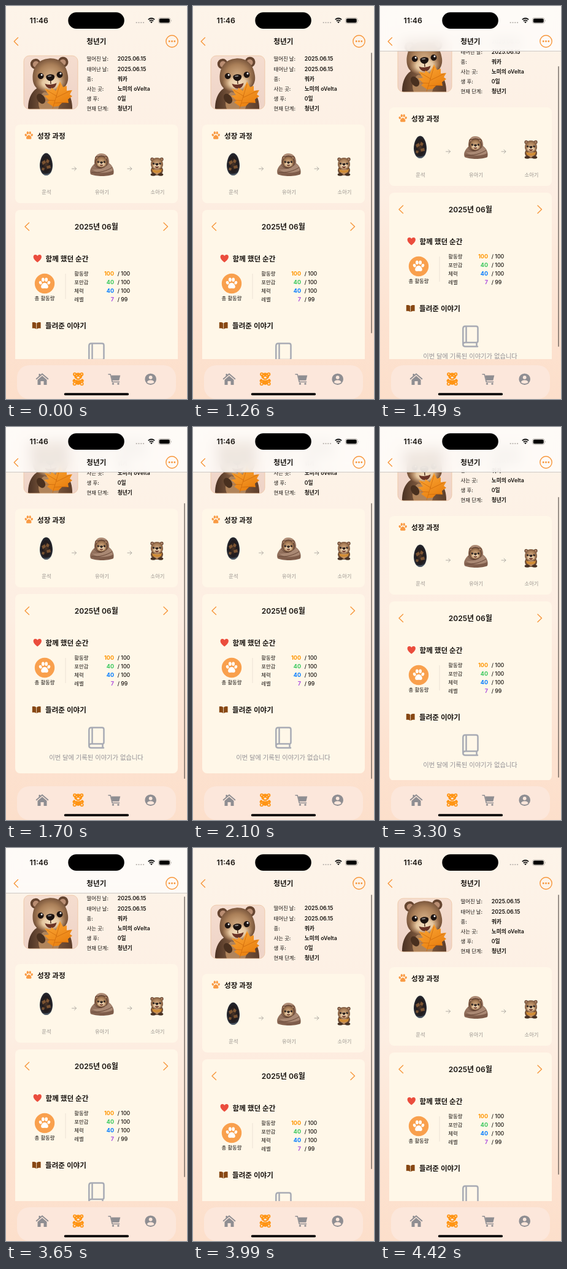
An HTML page that plays this animation: 295 by 640 pixels, repeating every 5420 ms.

```html
<!DOCTYPE html>
<html lang="ko">
<head>
<meta charset="utf-8">
<title>청년기</title>
<style>
  html, body { margin: 0; width: 100%; height: 100%; overflow: hidden; }
  #stage {
    position: relative; width: 295px; height: 640px; overflow: hidden;
    background: linear-gradient(#fdf4e9, #fdeee2 48%, #fde2d0 82%, #fcdfcb);
    font-family: Inter, "Noto Sans CJK KR", sans-serif;
  }
  #view { position: absolute; inset: 0 0 65px; overflow: hidden; }
  svg { position: absolute; left: 0; top: 0; display: block; }
  #bar {
    position: absolute; left: 0; top: 0; width: 295px; height: 73px;
    background: rgba(254, 252, 250, .84); backdrop-filter: blur(10px);
    border-bottom: .5px solid rgba(0, 0, 0, .2);
  }
  #thumb {
    position: absolute; left: 289.7px; width: 2.6px; border-radius: 2px;
    background: rgba(60, 55, 50, .52);
  }
  text { fill: #17130f; }
  .h { font-size: 11.6px; font-weight: 600; }
  .k { font-size: 8.4px; font-weight: 500; }
  .v { font-size: 8.8px; font-weight: 600; }
  .m { font-size: 8.8px; font-weight: 500; }
  .n { font-size: 9px; font-weight: 700; text-anchor: end; }
  .c { font-size: 8.3px; text-anchor: middle; fill: #96918c; }
  .mid { text-anchor: middle; }
  .line { fill: none; stroke: #f7973c; stroke-linecap: round; stroke-linejoin: round; stroke-width: 1.4; }
</style>
</head>
<body>
<div id="stage">
  <div id="view">
    <svg width="295" height="700">
      <defs>
        <symbol id="paw" viewBox="0 0 24 24">
          <g fill="currentColor">
            <ellipse cx="3.8" cy="11" rx="2.7" ry="3.5" transform="rotate(-22 3.8 11)"/>
            <ellipse cx="8.8" cy="5.2" rx="2.8" ry="3.9"/>
            <ellipse cx="15.2" cy="5.2" rx="2.8" ry="3.9"/>
            <ellipse cx="20.2" cy="11" rx="2.7" ry="3.5" transform="rotate(22 20.2 11)"/>
            <path d="M12 11c3.6 0 7 4.4 7 8 0 4-4 3-7 3s-7 1-7-3c0-3.6 3.4-8 7-8z"/>
          </g>
        </symbol>
        <radialGradient id="fur" cx=".5" cy=".5" r=".58">
          <stop stop-color="#d3ad84"/><stop offset=".55" stop-color="#ab8059"/><stop offset="1" stop-color="#664530"/>
        </radialGradient>
        <radialGradient id="muzzle">
          <stop stop-color="#f4dfc0"/><stop offset=".55" stop-color="#e5c7a0"/><stop offset="1" stop-color="#b98f69" stop-opacity=".1"/>
        </radialGradient>
        <linearGradient id="wall" x2="0" y2="1">
          <stop stop-color="#f5ddcf"/><stop offset="1" stop-color="#eed3c7"/>
        </linearGradient>
        <linearGradient id="body" x2="1">
          <stop stop-color="#4a3123"/><stop offset=".45" stop-color="#8a6345"/><stop offset="1" stop-color="#5c3d2a"/>
        </linearGradient>
        <linearGradient id="leafFill" x2=".6" y2="1">
          <stop stop-color="#fba93a"/><stop offset="1" stop-color="#ea800f"/>
        </linearGradient>
        <radialGradient id="stone" cx=".5" cy=".5" r=".56">
          <stop stop-color="#4a3426"/><stop offset=".55" stop-color="#1f1a1c"/><stop offset=".85" stop-color="#25272f"/><stop offset="1" stop-color="#6a7480"/>
        </radialGradient>
        <linearGradient id="wrap" x2=".3" y2="1">
          <stop stop-color="#b8967f"/><stop offset="1" stop-color="#7e5c4a"/>
        </linearGradient>
        <symbol id="head" viewBox="0 0 60 56">
          <circle cx="9" cy="10" r="8" fill="#664530"/><circle cx="9.5" cy="10.5" r="4.8" fill="#b98d72"/>
          <circle cx="51" cy="10" r="8" fill="#664530"/><circle cx="50.5" cy="10.5" r="4.8" fill="#b98d72"/>
          <path d="M30 3C47 3 56 15 57 31 58 46 47 55 30 55S2 46 3 31C4 15 13 3 30 3z" fill="url(#fur)"/>
          <ellipse cx="30" cy="40" rx="23" ry="15" fill="url(#muzzle)"/>
          <g fill="#1c1310">
            <circle cx="15.500" cy="29" r="4.600"/><circle cx="44.500" cy="29" r="4.600"/>
            <path d="M23.500 31c0-5 13-5 13 0 0 4-4 6.500-6.500 6.500s-6.500-2.500-6.500-6.500z"/>
            <path d="M21 41q9 4 18 0-2 8-9 8t-9-8z" fill="#6b3426"/>
          </g>
          <path d="M30 37v5" stroke="#51301f" stroke-width="1.400"/>
          <g fill="#fff"><circle cx="17" cy="27.300" r="1.400"/><circle cx="46" cy="27.300" r="1.400"/><ellipse cx="29" cy="30" rx="3" ry="1" opacity=".5"/></g>
        </symbol>
        <clipPath id="frame"><rect x="29" y="81" width="88" height="87" rx="9"/></clipPath>
        <path id="eggShape" d="M65.500 239.500c6 0 10.500 11 10.500 20.500 0 9-4.500 16-10.500 16s-10.500-7-10.500-16c0-9.500 4.500-20.500 10.500-20.500z"/>
        <clipPath id="egg"><use href="#eggShape"/></clipPath>
      </defs>
      <g id="page">
        <g clip-path="url(#frame)">
          <rect x="29" y="81" width="88" height="87" fill="url(#wall)"/>
          <path d="M36 170C35 146 46 128 72 128s37 18 36 42z" fill="url(#body)"/>
          <ellipse cx="70" cy="158" rx="17" ry="20" fill="#b0845b"/>
          <use href="#head" x="40" y="82" width="64" height="60" transform="rotate(-4 72 112)"/>
          <path d="M88 123l5 9 6-2 0 8 9-1-4 7 4 3-7 5 1 6-10-1-6 6-9 1-10-7 4-3-9-8 8-1-7-10 10 2 1-4 7 5z" fill="url(#leafFill)"/>
          <path d="M76 167l12-40M83 147l-17-10M82 149l23-11M79 158l20-1M80 154l-16-1" fill="none" stroke="#cf6a0c" stroke-width=".8"/>
          <ellipse cx="57" cy="151" rx="6" ry="9" fill="#49301f" transform="rotate(-35 57 151)"/>
        </g>
        <rect x="29" y="81" width="88" height="87" rx="9" fill="none" stroke="#ecc3a0" stroke-width=".8"/>
        <g id="facts"></g>

        <g fill="#fff7e8">
          <rect x="15" y="193" width="265" height="128" rx="8"/>
          <rect x="15" y="332" width="265" height="292" rx="8"/>
        </g>
        <use href="#paw" x="30" y="203.500" width="14.500" height="14.500" color="#f99a43"/>
        <text class="h" x="51" y="215.500">성장 과정</text>

        <use href="#eggShape" fill="url(#stone)"/>
        <g clip-path="url(#egg)">
          <path d="M58 254l5-3 2 4-5 4zM67 249l4 3-2 4-4-2zM66 261l6-2 1 5-6 1zM59 263l4 1-1 4-4-1z" fill="#b07540" opacity=".6"/>
          <path d="M55 271q10 6 21-2v9H55z" fill="#687a8b" opacity=".6"/>
        </g>
        <g>
          <path d="M138 274c-3-7 2-13 6-17-1-11 4-17 11-17 9 0 14 7 13 16 6 4 9 12 7 18-8 4-29 4-37 0z" fill="url(#wrap)"/>
          <ellipse cx="155.500" cy="254" rx="10.500" ry="10.500" fill="#5b3d2e"/>
          <use href="#head" x="145" y="243.500" width="21" height="20"/>
          <path d="M140 266c10 1 21-2 28-9 4 2 6 7 6 11-9 5-26 5-34-2z" fill="#a98873"/>
          <path d="M144 258c3 7 10 8 17 4M139 271c13 1 24-2 34-8" fill="none" stroke="#664737"/>
        </g>
        <g>
          <ellipse cx="246" cy="267.500" rx="10" ry="8.500" fill="#6d4a32"/>
          <ellipse cx="246" cy="269" rx="5.500" ry="5.500" fill="#c09064"/>
          <path d="M238 265q8 6 16 0l-1 5q-7 3-14 0z" fill="#d18d35"/>
          <ellipse cx="240" cy="274.500" rx="4.300" ry="2.200" fill="#453023"/><ellipse cx="252" cy="274.500" rx="4.300" ry="2.200" fill="#453023"/>
          <use href="#head" x="235" y="246" width="22" height="20.500"/>
        </g>
        <g fill="none" stroke="#aaa49e" stroke-width=".9" stroke-linecap="round" stroke-linejoin="round">
          <path id="arrow" d="M107.500 265h7m-3-3 3 3-3 3"/>
          <use href="#arrow" x="90.500"/>
        </g>
        <text class="c" x="66" y="306">운석</text>
        <text class="c" x="156.500" y="306">유아기</text>
        <text class="c" x="247" y="306">소아기</text>

        <path class="line" d="M37.500 353l-6.500 6.300 6.500 6.300M257 353l6.500 6.300-6.500 6.300"/>
        <text class="mid" x="147.300" y="363.500" font-size="12" font-weight="600">2025년 06월</text>

        <path d="M51.300 417.500C42 411 44 405 48 405c2 0 3 1.300 3.300 2.200.3-.9 1.300-2.200 3.300-2.200 4 0 6 6-3.300 12.500z" fill="#eb4d3d"/>
        <text class="h" x="64.500" y="415.900">함께 했던 순간</text>
        <circle cx="63" cy="452" r="16.200" fill="#f9a04d"/>
        <use href="#paw" x="53" y="441.500" width="20" height="20" color="#fff"/>
        <text class="k mid" x="63" y="479">총 활동량</text>
        <path d="M97 436v41" stroke="#e8ddd0" stroke-width=".8"/>
        <g id="stats"></g>

        <path d="M49.300 516.500c-2-1.600-4.500-1.700-6.500-1.200v9.700c2-.5 4.500-.2 6.500 1.300zm.8 0c2-1.600 4.500-1.700 6.500-1.200v9.700c-2-.5-4.500-.2-6.500 1.300z" fill="#874713"/>
        <text class="h" x="64" y="524.500">들려준 이야기</text>
        <g fill="none" stroke="#a8abb4" stroke-width="2.500" stroke-linejoin="round" stroke-linecap="round">
          <path d="M139 549.500h17.500q3 0 3 3v21q0 2.500-2.500 2.500H139q-3.700 0-3.700 3.200t3.700 3.200h20M135.300 579v-25.500q0-4 3.700-4M140.500 550v26M157.500 576v6"/>
        </g>
        <text class="mid" x="147" y="602" font-size="10.300" style="fill:#929095">이번 달에 기록된 이야기가 없습니다</text>
      </g>
    </svg>
  </div>
  <div id="bar"></div>
  <div id="thumb"></div>

  <svg width="295" height="640">
    <text x="38.500" y="28.300" font-size="12.300" font-weight="600">11:46</text>
    <rect x="101.300" y="10.300" width="91.500" height="26.700" rx="13.300"/>
    <g fill="#b5afaa"><circle cx="212.700" cy="27" r="1.100"/><circle cx="216.500" cy="27" r="1.100"/><circle cx="220.300" cy="27" r="1.100"/><circle cx="224.100" cy="27" r="1.100"/></g>
    <g fill="none" stroke="#111" stroke-width="1.700">
      <path d="M231.800 22.200q5.200-4.400 10.400 0M233.800 24.500q3.200-2.600 6.400 0"/>
    </g>
    <path d="M235.200 26q1.800-1.400 3.600 0L237 28z"/>
    <rect x="248.500" y="19.300" width="19.500" height="9.200" rx="3" fill="none" stroke="#a9a49e" stroke-width=".8"/>
    <rect x="249.800" y="20.600" width="16.900" height="6.600" rx="1.900"/>
    <path d="M269 22.500q1.500 1.400 0 2.800z" fill="#a9a49e"/>

    <path class="line" d="M19.500 51.500l-6.300 6.200 6.300 6.200"/>
    <text class="h mid" x="147.300" y="61.700">청년기</text>
    <circle class="line" cx="270.500" cy="57.500" r="9.700"/>
    <g fill="#f7973c"><circle cx="266.200" cy="57.500" r="1.400"/><circle cx="270.500" cy="57.500" r="1.400"/><circle cx="274.800" cy="57.500" r="1.400"/></g>

    <rect x="18" y="585" width="259" height="55" rx="20" fill="#fce7db"/>
    <g fill="#8f8e92">
      <path d="M59 598l10.500 9-1.200 1.400L59 600.500l-9.300 7.900-1.200-1.400 5-4.300V599h2.500v1.600z"/>
      <path d="M59 602.300l7.500 6.400v8.300h-5v-6h-5v6h-5v-8.300z"/>
      <path d="M171.500 601.500h14.800l-2 8.300h-11.300z"/>
      <path d="M167 599.800h3.200l3 12.400h11.500" fill="none" stroke="#8f8e92" stroke-width="1.500" stroke-linecap="round" stroke-linejoin="round"/>
      <circle cx="174.500" cy="615.200" r="1.600"/><circle cx="183" cy="615.200" r="1.600"/>
      <circle cx="235.700" cy="607.700" r="9.300"/>
      <g fill="#fce7db"><circle cx="235.700" cy="604.800" r="2.900"/><path d="M229.800 612.800c1-4.600 10.800-4.600 11.800 0-3 3-8.800 3-11.800 0z"/></g>
    </g>
    <g fill="#ff9514">
      <circle cx="112" cy="599.700" r="2.900"/><circle cx="123.400" cy="599.700" r="2.900"/>
      <ellipse cx="117.700" cy="602.700" rx="6.500" ry="5.500"/>
      <ellipse cx="117.700" cy="612" rx="5" ry="5"/>
      <ellipse cx="111" cy="610" rx="2.200" ry="2.700" transform="rotate(35 111 610)"/>
      <ellipse cx="124.400" cy="610" rx="2.200" ry="2.700" transform="rotate(-35 124.400 610)"/>
      <circle cx="111.800" cy="615.300" r="3"/><circle cx="123.600" cy="615.300" r="3"/>
    </g>
    <g fill="#fce7db">
      <circle cx="112" cy="599.500" r="1"/><circle cx="123.400" cy="599.500" r="1"/>
      <circle cx="115" cy="602" r=".8"/><circle cx="120.400" cy="602" r=".8"/>
      <ellipse cx="117.700" cy="605" rx="2.200" ry="1.500"/>
      <circle cx="111.800" cy="615.300" r="1.200"/><circle cx="123.600" cy="615.300" r="1.200"/>
      <path d="M113 608.300q4.700 1.800 9.400 0" fill="none" stroke="#fce7db" stroke-width=".8"/>
    </g>
    <rect x="94.700" y="630.200" width="105.500" height="3.800" rx="1.900"/>
  </svg>
</div>
<script>
const $ = id => document.getElementById(id);
const text = (cls, x, y, s, fill) =>
  `<text class="${cls}" x="${x}" y="${y}"${fill ? ` style="fill:${fill}"` : ''}>${s}</text>`;

const facts = [
  ['떨어진 날:', '2025.06.15'], ['태어난 날:', '2025.06.15'], ['종:', '쿼카'],
  ['사는 곳:', '노미의 oVelta'], ['생 후:', '0일'], ['현재 단계:', '청년기']
];
$('facts').innerHTML = facts.map(([k, v], i) => {
  const y = 89.4 + i * 16.2;
  return text('k', 131.5, y, k) + text('v', 181.7, y, v);
}).join('');

const stats = [
  ['활동량', 100, 100, '#ff9500'], ['포만감', 40, 100, '#34c759'],
  ['체력', 40, 100, '#007aff'], ['레벨', 7, 99, '#af52de']
];
$('stats').innerHTML = stats.map(([k, n, max, color], i) => {
  const y = 439.2 + i * 14;
  return text('k', 111.3, y, k) + text('n', 176, y, n, color) + text('m', 181.7, y, '/ ' + max);
}).join('');

// [time in ms, scroll offset]; the screen refreshes in hard steps
const LOOP = 5420;
const steps = [
  [0, 0], [1260, 0], [1370, 9], [1480, 28], [1590, 49], [1700, 60],
  [1840, 63], [1960, 63], [2100, 60], [2210, 56], [2320, 53], [2430, 51], [2540, 50], [2680, 49],
  [3300, 48], [3420, 40], [3530, 22], [3650, 4], [3770, -8],
  [3890, -12], [4000, -11], [4100, -8], [4210, -5], [4310, -3], [4420, -1]
];

function draw(t) {
  const off = steps.findLast(s => s[0] <= t)[1];
  $('page').setAttribute('transform', `translate(0 ${-off})`);
  $('bar').style.opacity = off > 1 ? 1 : 0;
  const top = Math.max(76, 76 + off * .8);
  const end = Math.min(573, 533 + off * .8);
  const thumb = $('thumb').style;
  thumb.opacity = t >= 1260 ? 1 : 0;
  thumb.top = top + 'px';
  thumb.height = end - top + 'px';
}

const start = performance.now();
function tick() {
  draw((performance.now() - start) % LOOP);
  requestAnimationFrame(tick);
}
tick();
</script>
</body>
</html>
```
